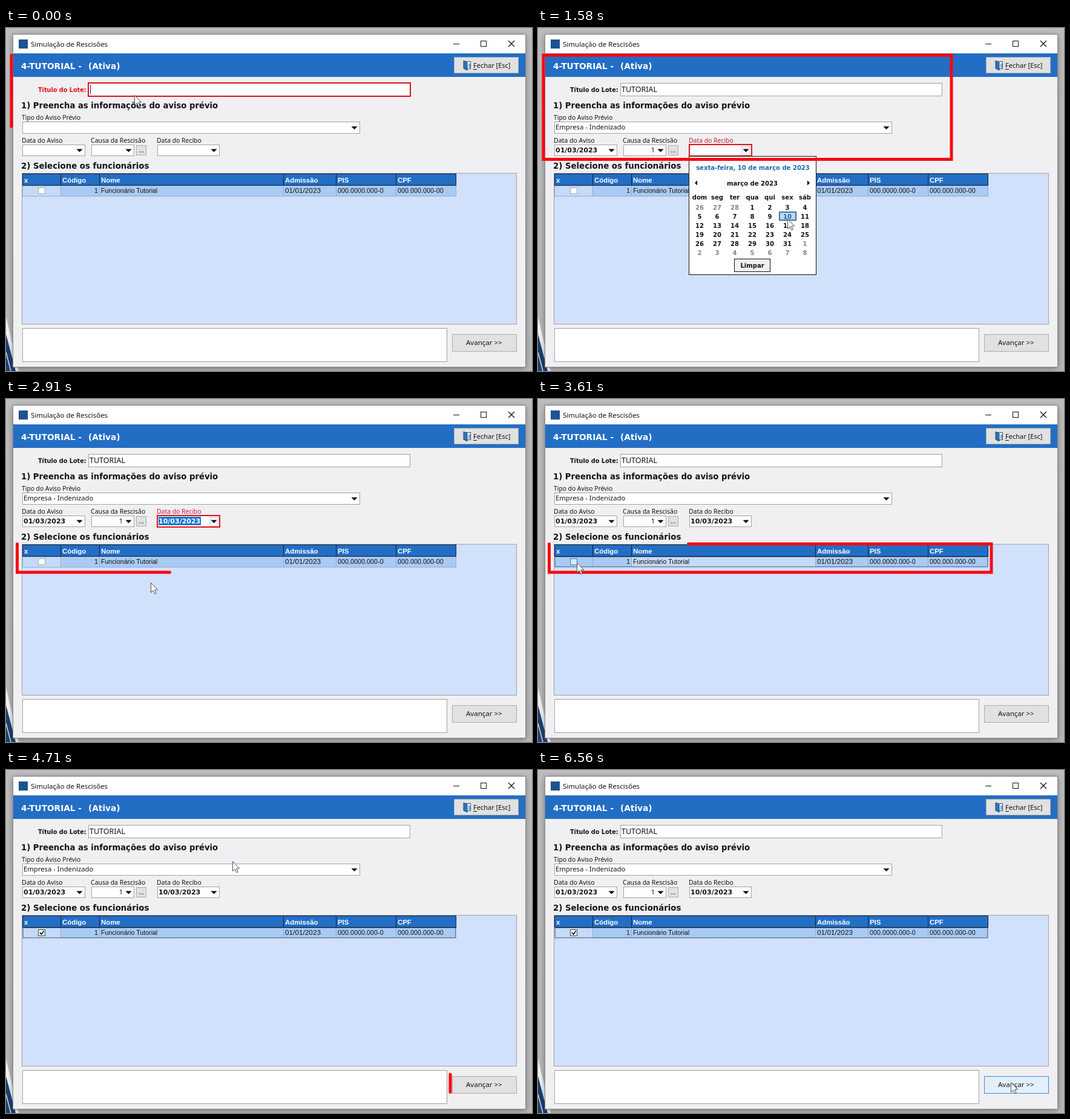
An HTML page with a canvas for the animation above (6.63 s loop, 869 by 568 pixels).

```html
<!DOCTYPE html>
<html lang="pt">
<head>
<meta charset="utf-8">
<title>Simulação de Rescisões</title>
<style>
html, body { margin: 0; width: 100%; height: 100%; overflow: hidden; background: #bfbfbf; }
canvas { display: block; }
</style>
</head>
<body>
<canvas id="stage" width="869" height="568"></canvas>
<script>
const ctx = document.getElementById('stage').getContext('2d');
const LOOP = 6630, DRAW = 1061;
const UI = '"Noto Sans", "Open Sans", sans-serif';
const GRID = '"Liberation Sans", Arial, sans-serif';
const WIDE = '"DejaVu Sans", sans-serif';
const RED = '#fb0711', BLUE = '#236ec5', INK = '#141414', LINE = '#a2a2a5', FOCUS = '#e0101c';

// Red outlines: corners, drawing start and time they are gone
const marks = [
  { x: 9, y: 45, r: 683, b: 217.5, start: -73, end: 2660 },
  { x: 18.5, y: 240, r: 749, b: 287, start: 2707, end: 4560 },
  { x: 734, y: 504, r: 848, b: 539, start: 4606, end: 6560 }
];

// Pointer path: time, x, y
const path = [
  [0, 212, 111], [1450, 212, 111], [1570, 412, 316], [1800, 412, 316],
  [2220, 381, 331], [2500, 381, 331], [3420, 64, 271], [4360, 64, 271],
  [4700, 374, 151], [4900, 374, 151], [5480, 537, 398], [5700, 609, 430],
  [6200, 781, 517], [LOOP, 781, 517]
];

function box(x, y, r, b, fill, stroke, width = 1) {
  if (fill) {
    ctx.fillStyle = fill;
    ctx.fillRect(x, y, r - x, b - y);
  }
  if (stroke) {
    const h = width / 2;
    ctx.strokeStyle = stroke;
    ctx.lineWidth = width;
    ctx.strokeRect(x + h, y + h, r - x - width, b - y - width);
  }
}

function text(s, x, y, size, { color = INK, bold = false, family = bold ? WIDE : UI, align = 'left' } = {}) {
  ctx.font = `${bold ? 'bold ' : ''}${size}px ${family}`;
  ctx.fillStyle = color;
  ctx.textAlign = align;
  ctx.fillText(s, x, y);
}

function poly(points, fill, stroke) {
  ctx.beginPath();
  points.forEach(([x, y]) => ctx.lineTo(x, y));
  ctx.closePath();
  if (fill) { ctx.fillStyle = fill; ctx.fill(); }
  if (stroke) { ctx.strokeStyle = stroke; ctx.lineWidth = 1; ctx.stroke(); }
}

function line(points, color, width = 1) {
  ctx.beginPath();
  points.forEach(([x, y]) => ctx.lineTo(x, y));
  ctx.strokeStyle = color;
  ctx.lineWidth = width;
  ctx.stroke();
}

function dotted(x, y, r, b) {
  ctx.setLineDash([1, 1]);
  box(x, y, r, b, null, '#24354f');
  ctx.setLineDash([]);
}

function combo(x, y, r, b, focused) {
  box(x, y, r, b, '#fff', LINE);
  if (focused) {
    box(r - 17, y + 2, r - 2, b - 1, '#f4f4f5', '#cdcdd0');
    box(x - 1, y - 1, r + 1, b + 1, null, FOCUS, 2);
  }
  const cx = r - 9.5, cy = (y + b) / 2;
  poly([[cx - 5, cy - 2], [cx + 5, cy - 2], [cx, cy + 3]], '#000');
}

function windowFrame() {
  const bg = ctx.createLinearGradient(0, 0, 0, 568);
  bg.addColorStop(0, '#bebebe');
  bg.addColorStop(1, '#b8b8b9');
  box(0, 0, 869, 568, bg);
  poly([[0, 478], [21, 568], [0, 568]], '#f2f3f5');
  poly([[0, 507], [16, 568], [0, 568]], '#1d406f');
  line([[0, 537], [8, 568]], '#dde2ea', 1.5);

  ctx.save();
  ctx.shadowColor = 'rgba(0,0,0,.45)';
  ctx.shadowBlur = 10;
  ctx.shadowOffsetY = 2;
  box(12, 11, 858, 561, '#f0eff1');
  ctx.restore();
  box(12, 11, 858, 42, '#fff');
  box(12, 42, 858, 81, BLUE);
  box(11, 10, 859, 562, null, '#88888a');

  box(21, 19, 36, 34, '#1c5391');
  text('Simulação de Rescisões', 41, 31, 11.5);
  line([[739, 26.5], [749, 26.5]], '#111');
  box(784, 21, 794, 31, null, '#111');
  line([[830, 21], [840, 31]], '#111', 1.2);
  line([[840, 21], [830, 31]], '#111', 1.2);

  const caption = { color: '#fff', bold: true };
  text('4-TUTORIAL -', 25, 68, 13.7, caption);
  text('(Ativa)', 136, 68, 13.7, caption);

  box(740, 48, 847, 75, '#e1e1e2', '#adadad');
  box(756, 55, 768, 68, '#f5f8fc', '#33537b');
  poly([[756, 54], [762, 57], [762, 70], [756, 67]], '#2c72bd', '#264a78');
  box(764, 59, 767, 66, '#86a9d0');
  text('Fechar [Esc]', 772, 66, 11);
  line([[772, 68.5], [778, 68.5]], INK);
}

function form(t) {
  const titled = t < 1450;
  const typed = 'TUTORIAL'.slice(0, Math.max(0, Math.floor((t - 450) / 68)));
  text('Título do Lote:', 53, 105.5, 9.7, { color: titled ? FOCUS : INK, bold: true });
  box(136, 91, 668, 113, '#fff', LINE);
  if (titled) box(135, 90, 669, 114, null, FOCUS, 2);
  text(typed, 138, 106, 12.5);
  if (titled) {
    const caret = 139.5 + ctx.measureText(typed).width;
    line([[caret, 94], [caret, 109]], '#222');
  }

  text('1) Preencha as informações do aviso prévio', 25, 133, 13.2, { bold: true });
  text('Tipo do Aviso Prévio', 26, 152, 10.3);
  combo(27, 155, 585, 175);
  text('Data do Aviso', 26, 190, 10.5);
  combo(27, 193, 131, 212);
  text('Causa da Rescisão', 140, 190, 10.5);
  combo(141, 193, 212, 212);
  box(215, 194, 232, 211, '#e1e1e1', '#adadad');
  text('...', 223.5, 206, 11, { align: 'center' });

  const receipt = t >= 1500 && t < 3420;
  text('Data do Recibo', 249, 190, 10.4, { color: receipt ? '#c9172e' : INK });
  combo(250, 193, 353, 212, receipt);
  if (!titled) {
    text('Empresa - Indenizado', 29, 168, 11.3);
    text('01/03/2023', 29, 206, 11, { bold: true });
    text('1', 193, 206, 11, { align: 'right' });
  }
  if (t >= 1700) {
    if (receipt) box(252, 195, 322, 209, '#1976d2');
    text('10/03/2023', 252, 206, 11, { color: receipt ? '#fff' : INK, bold: true });
  }
  text('2) Selecione os funcionários', 25, 233, 13.3, { bold: true });
}

function table(t) {
  const named = t >= 3420 && t < 3820;
  const cols = [27, 90, 154, 458, 545, 644, 743];
  const heads = ['x', 'Código', 'Nome', 'Admissão', 'PIS', 'CPF'];
  const cell = { family: GRID };
  box(26, 240, 844, 491, '#d1e0fb', LINE);
  heads.forEach((head, i) => {
    const x = cols[i], r = cols[i + 1];
    const light = i === (named ? 2 : 0);
    box(x, 241, r + 1, 261, BLUE, '#10233d');
    text(head, x + 3, 256, 11.4, { color: '#fff', bold: true, family: GRID });
    box(x, 261, r + 1, 279, light ? '#c5daf7' : '#a9caf2', '#91aed3');
  });
  text('1', 152, 273, 10.8, { family: GRID, align: 'right' });
  text('Funcionário Tutorial', 157, 273, 10.6, cell);
  text('01/01/2023', 461, 273, 11.8, cell);
  text('000.0000.000-0', 548, 273, 10.8, cell);
  text('000.000.000-00', 647, 273, 10.8, cell);
  if (t >= 3420) dotted(28, 261, 743, 278);

  const checked = t >= 3820, over = t >= 3380 && t < 4360;
  box(53, 264, 65, 275, over ? '#d8e9fb' : '#fff', over ? '#2f7fd0' : checked ? '#444' : '#aaa');
  if (checked) line([[56, 269], [58.5, 272], [62.5, 266.5]], '#111', 1.7);
}

function calendar() {
  const label = (s, x, y, color = INK) => text(s, x, y, 10.05, { color, bold: true, align: 'center' });
  box(249, 212, 460, 409, '#fff', '#111');
  label('sexta-feira, 10 de março de 2023', 355, 234.5, '#2067b5');
  label('março de 2023', 354, 260.5);
  poly([[259, 256.5], [263, 252.5], [263, 260.5]], '#000');
  poly([[449, 256.5], [445, 252.5], [445, 260.5]], '#000');
  ['dom', 'seg', 'ter', 'qua', 'qui', 'sex', 'sáb'].forEach((d, i) => label(d, 267 + 29 * i, 283.5));
  box(398, 304, 427, 319, '#bbd8f6', '#28538a');
  dotted(399, 305, 426, 318);
  for (let i = 0; i < 42; i++) {
    const day = new Date(2023, 1, 26 + i);
    const color = day.getMonth() !== 2 ? '#858585' : i === 12 ? '#2067b5' : INK;
    label(day.getDate(), 267 + 29 * (i % 7), 300.5 + 15 * Math.floor(i / 7), color);
  }
  box(324, 382, 384, 404, '#f0f0f0', '#111');
  label('Limpar', 354, 396.5);
}

function mark(m, t) {
  if (t < m.start || t >= m.end) return;
  const length = 2 * (m.r - m.x + m.b - m.y);
  const part = Math.min(1, (t - m.start) / DRAW);
  ctx.save();
  ctx.globalAlpha = Math.min(1, (m.end - t) / 100);
  ctx.strokeStyle = RED;
  ctx.lineWidth = 5;
  ctx.lineCap = 'round';
  ctx.beginPath();
  ctx.moveTo(m.x, m.y);
  ctx.lineTo(m.x, m.b);
  ctx.lineTo(m.r, m.b);
  ctx.lineTo(m.r, m.y);
  ctx.closePath();
  if (part < 1) ctx.setLineDash([length * part, length * 2]);
  ctx.stroke();
  ctx.restore();
}

function pointerAt(t) {
  const i = path.findIndex(p => p[0] > t);
  const [t0, x0, y0] = path[i - 1], [t1, x1, y1] = path[i];
  const k = (t - t0) / (t1 - t0);
  return [x0 + (x1 - x0) * k, y0 + (y1 - y0) * k];
}

function pointer([x, y]) {
  ctx.save();
  ctx.translate(Math.round(x) + .5, Math.round(y) + .5);
  poly([[0, 0], [0, 16], [3.7, 12.6], [6.3, 18.3], [8.7, 17.2], [6.2, 11.6], [11, 11.3]], '#fff', '#4a4c55');
  ctx.restore();
}

function draw(t) {
  const spot = pointerAt(t);
  const hover = spot[0] > 738 && spot[1] > 508;
  windowFrame();
  form(t);
  table(t);
  box(27, 497, 729, 553, '#fff', LINE);
  box(737, 507, 844, 536, hover ? '#e3effb' : '#e1e1e2', hover ? '#3d8bd5' : '#adadad');
  text('Avançar >>', 760, 525, 11.5);
  if (t >= 1500 && t < 1700) calendar();
  marks.forEach(m => mark(m, t));
  pointer(spot);
}

const begin = performance.now();
function tick() {
  draw((performance.now() - begin) % LOOP);
  requestAnimationFrame(tick);
}
tick();
</script>
</body>
</html>
```
